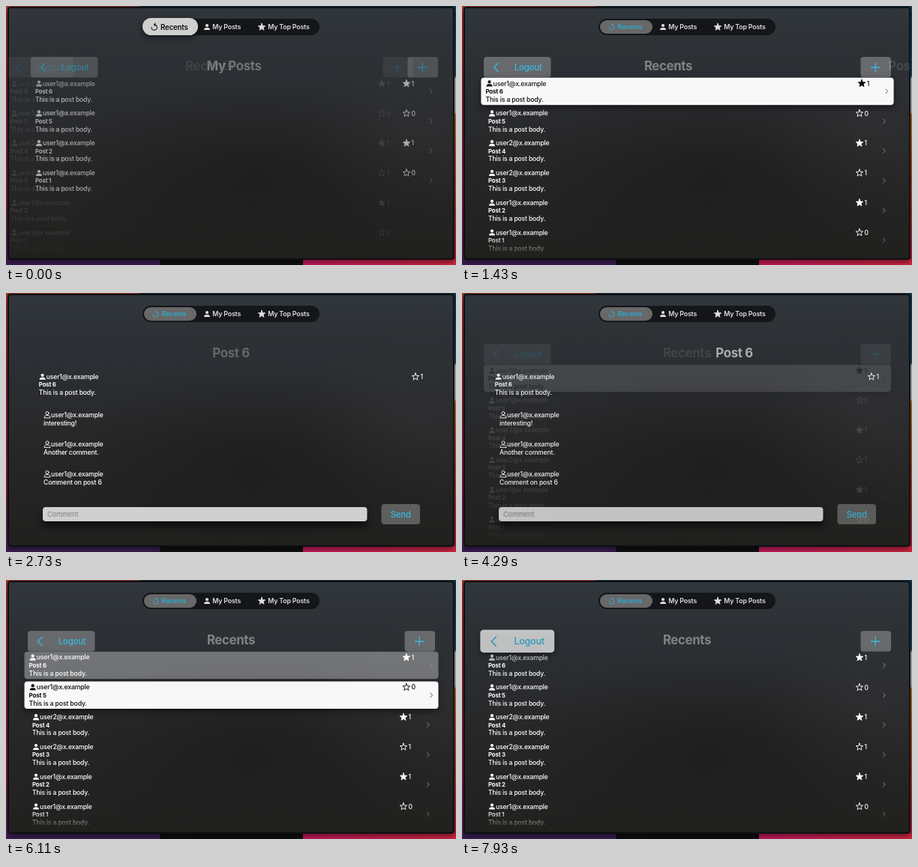
An HTML page for the animation above (8 s loop, 600 px wide and 346 px high).

```html
<!DOCTYPE html>
<html lang="en">
<head>
<meta charset="utf-8">
<title>Posts</title>
<style>
  html, body { margin: 0; width: 100%; height: 100%; overflow: hidden; background: #111; }
  svg { display: block; width: 100%; height: 100%; }
  text { font-family: Inter, "Open Sans", sans-serif; letter-spacing: -.02em; fill: currentColor; white-space: pre; }
  .body { font-size: 8.6px; font-weight: 500; }
  .name { font-size: 7.8px; font-weight: 700; }
  .tab { font-size: 8.8px; font-weight: 600; }
  .title { font-size: 16.8px; font-weight: 700; text-anchor: middle; }
  .btn { font-size: 11.4px; font-weight: 500; }
  .line { fill: none; stroke: currentColor; stroke-linecap: round; stroke-linejoin: round; }
  .lift { filter: drop-shadow(0 3px 4px rgba(0, 0, 0, .55)); }
</style>
</head>
<body>
<script>
const LOOP = 8000, STEP = 130;
const CYAN = '#38b7df';
const USER1 = 'user1@x.example', USER2 = 'user2@x.example';

// Post number, author, likes, liked
const recentPosts = [
  [6, USER1, 1, true], [5, USER1, 0, false], [4, USER2, 1, true],
  [3, USER2, 1, false], [2, USER1, 1, true], [1, USER1, 0, false]
];
const myPosts = recentPosts.filter(post => post[1] === USER1);

const text = (cls, x, y, str, extra = '') =>
  `<text class="${cls}" x="${x}" y="${y}" ${extra}>${str}</text>`;

const rect = (x, y, w, h, r, extra = '') =>
  `<rect x="${x}" y="${y}" width="${w}" height="${h}" rx="${r}" ${extra}/>`;

function person(x, y, solid = true) {
  const paint = solid ? 'fill="currentColor"' : 'class="line" stroke-width=".9"';
  return `<g transform="translate(${x} ${y})" ${paint}><circle cy="-2" r="2.1"/>
    <path d="M-4 4C-4 1.4-2 .9 0 .9S4 1.4 4 4Z"/></g>`;
}

function star(x, y, r, solid = true) {
  const points = Array.from({ length: 10 }, (_, i) => {
    const a = i * Math.PI / 5, d = i % 2 ? r * .42 : r;
    return `${(x + d * Math.sin(a)).toFixed(2)},${(y - d * Math.cos(a)).toFixed(2)}`;
  });
  return `<polygon points="${points.join(' ')}" class="line" stroke-width=".9"
    ${solid ? 'style="fill:currentColor"' : ''}/>`;
}

function row([n, who, likes, liked], i) {
  return `<g class="row" data-y="${114 + 39.8 * i}">
    ${rect(29, -18, 543, 36, 4, 'class="plate lift" fill="#f8f8f8" opacity="0"')}
    <g class="ink">
      <g class="author">${person(40, -10.4)}${text('body', 45, -7.4, who)}</g>
      ${text('name', 35, 2.9, 'Post ' + n)}
      ${text('body', 35, 13.9, 'This is a post body.')}
      ${star(530, -10.3, 5, liked)}${text('body', 536.5, -7.3, likes)}
    </g>
    <path class="line" d="M561.5-2.8L564.3 0L561.5 2.8" style="color:#8a8a8a"/>
  </g>`;
}

function page(id, title, posts) {
  return `<g id="${id}">
    <g class="logout" style="color:${CYAN}">
      ${rect(29, 68, 89.5, 27.5, 4, 'class="face" fill="#fff"')}
      <path class="line" stroke-width="1.4" d="M48 76.5L42.6 82L48 87.5"/>
      ${text('btn', 69.8, 86, 'Logout')}
    </g>
    ${rect(531.5, 68, 40.5, 27.5, 4, 'fill="#fff" opacity=".28"')}
    <path class="line" stroke-width="1.4" style="color:${CYAN}" d="M545.5 82H557M551.2 76.2V87.8"/>
    <g class="heading">${text('title', 300, 85.6, title, 'opacity=".4"')}</g>
    <g class="list" mask="url(#bottomFade)">${posts.map(row).join('')}</g>
  </g>`;
}

function comment(y, str) {
  return person(55, y, false) + text('body', 60, y + 3, USER1) + text('body', 50, y + 14, str);
}

const stops = list => list.map(([at, color, alpha = 1]) =>
  `<stop offset="${at}" stop-color="${color}" stop-opacity="${alpha}"/>`).join('');

const defs = `<defs>
  <linearGradient id="base" x2="0" y2="1">${stops([[0, '#30363b'], [.3, '#2b2e32'], [.6, '#272728'], [1, '#20201e']])}</linearGradient>
  <radialGradient id="dim">${stops([[0, '#171412', .4], [1, '#171412', 0]])}</radialGradient>
  <radialGradient id="glow">${stops([[0, '#4a4648', .14], [1, '#4a4648', 0]])}</radialGradient>
  <linearGradient id="leftEdge" x2="0" y2="1">${stops([[0, '#a8352c'], [.4, '#8c2230'], [.75, '#8a1c48'], [1, '#46215f']])}</linearGradient>
  <linearGradient id="rightEdge" x2="0" y2="1">${stops([[0, '#123a55'], [.27, '#1d4f6c'], [.28, '#b9bcbe'], [.41, '#b9bcbe'], [.42, '#b8742c'], [.65, '#a85028'], [1, '#c01c4c']])}</linearGradient>
  <linearGradient id="pink" x2="1" y2="0">${stops([[0, '#cb1a5e'], [1, '#d22742']])}</linearGradient>
  <linearGradient id="fade" gradientUnits="userSpaceOnUse" x1="0" y1="306" x2="0" y2="334">${stops([[0, '#fff'], [1, '#000']])}</linearGradient>
  <mask id="bottomFade" maskUnits="userSpaceOnUse" x="-60" y="60" width="720" height="280">
    <rect x="-60" y="60" width="720" height="280" fill="url(#fade)"/></mask>
  <clipPath id="window">${rect(3, 2, 594, 336, 3)}</clipPath>
</defs>`;

const backdrop = `
  <rect width="600" height="346" fill="#14161a"/>
  <rect width="178" height="3" fill="#a03a2a"/><rect x="178" width="422" height="3" fill="#12303f"/>
  <rect width="4" height="346" fill="url(#leftEdge)"/>
  <rect x="596" width="4" height="346" fill="url(#rightEdge)"/>
  <rect y="338" width="205" height="8" fill="#3b1e53"/>
  <rect x="205" y="338" width="191" height="8" fill="#0f0f11"/>
  <rect x="396" y="338" width="204" height="8" fill="url(#pink)"/>
  <g class="lift">${rect(3, 2, 594, 336, 3, 'fill="url(#base)" stroke="#0e1012" stroke-width="2"')}</g>
  <g clip-path="url(#window)">
    <ellipse cx="330" cy="225" rx="260" ry="130" fill="url(#dim)"/>
    <ellipse cx="540" cy="170" rx="150" ry="110" fill="url(#glow)"/>
  </g>`;

const tabs = `
  ${rect(182, 17, 236, 22, 11, 'fill="#141619"')}
  <rect id="pill" class="lift"/>
  <g id="tabInk">
    <path class="line" d="M196.2 28.5A3.4 3.4 0 1 0 199.6 25.1M200.9 23.6L199.4 25.1L200.9 26.6"/>
    ${text('tab', 207.3, 31.2, 'Recents')}
  </g>
  <g style="color:#dedede">
    ${person(268, 28)}${text('tab', 275.3, 31.2, 'My Posts')}
    ${star(341, 28.2, 5)}${text('tab', 349.3, 31.2, 'My Top Posts')}
  </g>`;

const detail = `<g id="detail">
  ${person(48.6, 111.8)}${text('body', 53.8, 114.8, USER1)}
  ${text('name', 43.8, 125, 'Post 6')}${text('body', 43.8, 135.8, 'This is a post body.')}
  ${star(546, 112, 5, false)}${text('body', 552.6, 115, 1)}
  ${comment(162.5, 'interesting!')}${comment(202, 'Another comment.')}${comment(241.6, 'Comment on post 6')}
  ${rect(49, 286, 432.5, 19, 4, 'fill="#d0d0d0" style="filter:drop-shadow(0 7px 5px rgba(0,0,0,.6))"')}
  ${text('body', 55, 298.7, 'Comment', 'style="color:#8b8b8b;font-size:9.2px"')}
  ${rect(500.5, 282, 51.5, 27, 4, 'fill="#fff" opacity=".28"')}
  ${text('btn', 526.2, 299.7, 'Send', `text-anchor="middle" style="color:${CYAN}"`)}
</g>`;

document.body.innerHTML = `<svg viewBox="0 0 600 346" preserveAspectRatio="none" style="color:#fff">
  ${defs}${backdrop}
  <g clip-path="url(#window)">
    ${page('recents', 'Recents', recentPosts)}${page('mine', 'My Posts', myPosts)}${detail}
    <g id="detailTitle">${text('title', 300, 85.6, 'Post 6')}</g>
  </g>
  ${tabs}</svg>`;

// Each track lists [time in ms, value]
const tracks = {
  mineX: [[0, 4], [600, 33]],
  mineAlpha: [[0, .6], [420, 0]],
  recentsX: [[0, -29], [600, 0]],
  recentsAlpha: [[0, .22], [600, 1], [1430, 1], [1850, 0], [4160, 0], [4290, .25], [4650, 1]],
  headingX: [[1300, 0], [1430, -25], [1950, -300], [2080, 0]],
  detailAlpha: [[1430, 0], [1950, 1], [4160, 1], [4290, .93], [4650, 0]],
  titleX: [[1300, 318], [1430, 293], [1950, 0], [4160, 0], [4290, 63], [4680, 250]],
  titleAlpha: [[1300, 0], [1430, .12], [1950, .27], [4160, .27], [4290, .6], [4680, 0]],
  tab: [[520, 1], [780, 0]],
  first: [[600, 0], [860, 1], [5980, 1], [6110, .34], [6240, 0],
    [6500, 0], [6630, 1], [6890, 1], [7150, 0]],
  firstSize: [[600, 0], [860, 1], [1300, 1], [1430, .8], [1560, 1], [4160, 1], [4161, 0], [4290, 0], [4650, 1],
    [6110, 1], [6300, 0], [6500, 0], [6630, 1], [6890, 1], [7150, 0]],
  second: [[5980, 0], [6110, 1], [6500, 1], [6630, .34], [6760, 0]],
  secondSize: [[5980, 0], [6110, 1], [6630, 1], [6820, 0]],
  logout: [[6890, 0], [7150, 1]]
};

function at(name, t) {
  const keys = tracks[name];
  const next = keys.findIndex(key => key[0] > t);
  if (next === 0) return keys[0][1];
  if (next < 0) return keys[keys.length - 1][1];
  const [t0, a] = keys[next - 1], [t1, b] = keys[next];
  const u = (t - t0) / (t1 - t0);
  return a + (b - a) * u * u * (3 - 2 * u);
}

const $ = sel => document.querySelector(sel);
const mix = (a, b, u) => a + (b - a) * u;
const set = (el, attrs) => { for (const key in attrs) el.setAttribute(key, attrs[key]); };
const move = (el, x, alpha) => set(el, { transform: `translate(${x} 0)`, opacity: alpha });
const scaleAt = (x, y, s) => `translate(${x} ${y}) scale(${s}) translate(${-x} ${-y})`;

function paintRow(el, focus, size) {
  set(el, { transform: `translate(300 ${el.dataset.y}) scale(${1 + .0166 * size}) translate(-300 0)` });
  set(el.querySelector('.plate'), { opacity: focus });
  el.querySelector('.ink').style.color = focus > .5 ? '#0a0a0a' : '#fff';
}

function paintLogout(el, focus) {
  set(el, { transform: scaleAt(73.8, 82, 1 + .105 * focus) });
  el.classList.toggle('lift', focus > 0);
  set(el.querySelector('.face'), { opacity: mix(.28, .72, focus) });
  el.style.color = focus > .5 ? '#2b97ba' : CYAN;
}

function paintTab(focus) {
  const shade = mix(104, 208, focus);
  set($('#pill'), {
    x: mix(184, 182, focus), y: mix(19, 16, focus),
    width: mix(70, 74, focus), height: mix(18, 23, focus), rx: mix(9, 11.5, focus),
    fill: `rgb(${shade},${shade},${shade})`
  });
  $('#pill').classList.toggle('lift', focus > 0);
  set($('#tabInk'), { transform: scaleAt(219, 28, 1 + .1 * focus) });
  $('#tabInk').style.color = focus > .5 ? '#0c0c0c' : '#2fa9cf';
}

const rows = [...document.querySelectorAll('.row')];
rows.forEach(el => paintRow(el, 0, 0));
const [first, second] = document.querySelectorAll('#recents .row');
paintLogout($('#mine .logout'), 0);
set($('#mine .author'), { opacity: .8 });
set($('#mine .title'), { opacity: .55 });

function draw(t) {
  const v = name => at(name, t);
  const shown = v('recentsAlpha');
  move($('#mine'), v('mineX'), v('mineAlpha'));
  move($('#recents'), v('recentsX'), shown);
  move($('#recents .heading'), v('headingX'), 1);
  // Rows fade in behind the header
  set($('#recents .list'), { opacity: Math.sqrt(shown) });
  move($('#detail'), 0, v('detailAlpha'));
  move($('#detailTitle'), v('titleX'), v('titleAlpha'));
  paintTab(v('tab'));
  paintRow(first, v('first'), v('firstSize'));
  set(first.querySelector('.author'), { opacity: mix(.7, 1, v('firstSize')) });
  paintRow(second, v('second'), v('secondSize'));
  paintLogout($('#recents .logout'), v('logout'));
}

const start = performance.now();
function tick() {
  const t = (performance.now() - start) % LOOP;
  draw(Math.floor(t / STEP) * STEP);
  requestAnimationFrame(tick);
}
tick();
</script>
</body>
</html>
```
